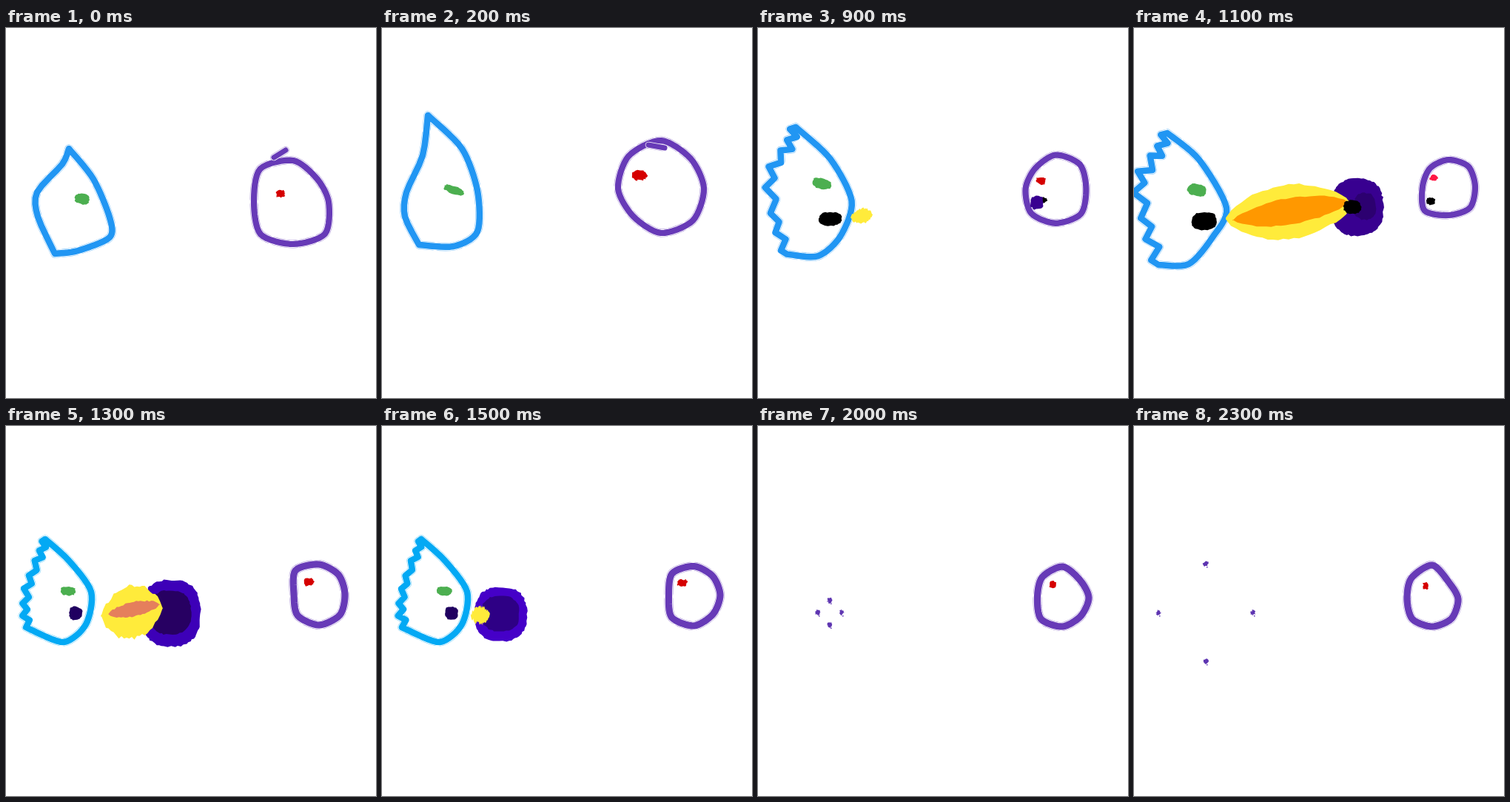
Recreate the animation shown at these times as an HTML page with a canvas. Size 500 by 500 pixels, loop 2400 ms.

```html
<!DOCTYPE html>
<html lang="en">
<head>
<meta charset="utf-8">
<title>Beam duel</title>
<style>
html, body { margin: 0; width: 100%; height: 100%; overflow: hidden; background: #fff; }
canvas { display: block; width: 500px; height: 500px; }
</style>
</head>
<body>
<canvas id="stage" width="500" height="500"></canvas>
<script>
const ctx = document.getElementById('stage').getContext('2d');
const STEP = 100, LOOP = 2400, TAU = Math.PI * 2;

let seed = 1;
function rnd() {
  seed = (seed * 16807) % 2147483647;
  return seed / 2147483647;
}
const jit = a => (rnd() * 2 - 1) * a;

// Values that blend linearly from key to key, and hold after the last.
class Track {
  constructor() { this.keys = []; }
  key(at, ...v) {
    this.keys.push({ at, v });
    return this;
  }
  get(f) {
    const i = Math.max(0, this.keys.findLastIndex(k => k.at <= f));
    const a = this.keys[i], b = this.keys[i + 1];
    if (!b) return a.v;
    const u = Math.max(0, (f - a.at) / (b.at - a.at));
    return a.v.map((x, j) => x + (b.v[j] - x) * u);
  }
}

const toPoints = v => Array.from({ length: v.length / 2 }, (_, i) => [v[2 * i], v[2 * i + 1]]);

// Smooth curve through a few points, n samples per span.
function curve(pts, n, closed) {
  const out = [], m = pts.length, spans = closed ? m : m - 1;
  const at = i => closed ? pts[(i + m) % m] : pts[Math.max(0, Math.min(m - 1, i))];
  for (let i = 0; i < spans; i++) {
    const [p, a, b, q] = [at(i - 1), at(i), at(i + 1), at(i + 2)];
    for (let s = 0; s < n; s++) {
      const u = s / n, u2 = u * u, u3 = u2 * u;
      out.push([0, 1].map(k =>
        a[k] * (2 * u3 - 3 * u2 + 1) + b[k] * (3 * u2 - 2 * u3) +
        0.42 * ((b[k] - p[k]) * (u3 - 2 * u2 + u) + (q[k] - a[k]) * (u3 - u2))));
    }
  }
  if (!closed) out.push(at(m - 1));
  return out;
}

// Push every second sample outwards and the others inwards.
function teeth(pts, size) {
  const last = pts.length - 1;
  return pts.map(([x, y], i) => {
    if (i === 0 || i === last) return [x, y];
    const dx = pts[i + 1][0] - pts[i - 1][0], dy = pts[i + 1][1] - pts[i - 1][1];
    const d = (i % 2 ? 1 : -1) * size * (0.85 + jit(0.25)) / Math.hypot(dx, dy);
    return [x + dy * d, y - dx * d];
  });
}

function trace(pts, closed) {
  ctx.beginPath();
  for (const [x, y] of pts) ctx.lineTo(x, y);
  if (closed) ctx.closePath();
}

function brush(pts, color, width, closed) {
  const line = (w, c, alpha) => {
    ctx.lineWidth = w;
    ctx.strokeStyle = c;
    ctx.globalAlpha = alpha;
    ctx.stroke();
    ctx.globalAlpha = 1;
  };
  trace(pts, closed);
  ctx.lineCap = ctx.lineJoin = 'round';
  // broken hairline along both edges
  ctx.setLineDash([19, 5, 31, 7]);
  line(width + 2.8, color, 0.5);
  ctx.setLineDash([]);
  line(width + 1.6, '#fff', 1);
  line(width, color, 1);
}

function fill(pts, color) {
  trace(pts);
  ctx.fillStyle = color;
  ctx.fill();
}

// Rounded box with a rough edge
function patch([cx, cy, rx, ry, tilt = 0], color, rough = 0.8) {
  const pts = [], n = Math.ceil(12 + (rx + ry) * 0.8);
  const bend = c => Math.sign(c) * Math.abs(c) ** 0.8;
  const co = Math.cos(tilt), si = Math.sin(tilt);
  for (let i = 0; i < n; i++) {
    const a = i / n * TAU;
    const x = rx * bend(Math.cos(a)) + jit(rough), y = ry * bend(Math.sin(a)) + jit(rough);
    pts.push([cx + x * co - y * si, cy + x * si + y * co]);
  }
  fill(pts, color);
}

// Spindle from one end to the other
function lens([x0, y0, x1, y1, h], color, rough) {
  const up = [], down = [], n = 24;
  for (let i = 0; i <= n; i++) {
    const u = i / n, x = x0 + (x1 - x0) * u, y = y0 + (y1 - y0) * u;
    const w = h * Math.sin(Math.PI * u) ** 0.65;
    up.push([x, y - w + jit(rough)]);
    down.unshift([x, y + w + jit(rough)]);
  }
  fill(up.concat(down), color);
}

// Left head: tooth size, then six points from the tip down the front, three up the back
const leftShape = new Track()
  .key(0, 0, 85,163, 118,204, 140,256, 140,283, 97,301, 66,305, 43,255, 42,222, 76,184)
  .key(2, 0, 62,118, 108,163, 129,220, 129,275, 97,295, 50,293, 31,255, 33,222, 55,172)
  .key(6, 4, 60,122, 112,175, 129,220, 120,278, 92,292, 48,284, 33,253, 30,192, 53,148)
  .key(11, 8, 45,142, 88,178, 125,243, 106,283, 74,319, 33,320, 18,270, 7,208, 34,170)
  .key(13, 4.5, 53,153, 85,182, 115,224, 108,268, 78,292, 33,275, 25,248, 31,212, 46,176);

// Right head: centre, then the reach in eight directions, clockwise from the right
const rightShape = new Track()
  .key(0, 388,235, 48, 61, 57, 62, 53, 63, 56, 45)
  .key(2, 377,217, 58, 61, 60, 53, 58, 62, 65, 57)
  .key(6, 368,222, 49, 59, 58, 48, 49, 45, 60, 59)
  .key(11, 425,214, 36, 41, 39, 46, 35, 35, 36, 38)
  .key(13, 423,227, 35, 40, 42, 41, 34, 45, 40, 37)
  .key(17, 420,230, 36, 33, 41, 44, 34, 38, 38, 35)
  .key(23, 403,234, 35, 37, 37, 38, 34, 40, 46, 32);
const penTail = new Track().key(0, 362,175, 378,165).key(2, 360,158, 382,162).key(6, 353,161, 364,160);

// Spots: centre, half size, tilt
const greenEye = new Track()
  .key(0, 103,231, 10,7, 0.15).key(2, 97,219, 14,5, 0.35)
  .key(6, 88,197, 13,6, 0.15).key(11, 85,219, 13,8, 0.25).key(13, 84,223, 10,6, 0.05);
const leftMouth = new Track()
  .key(4, 101,252, 8,3, 0).key(6, 102,253, 13,5, 0.04).key(11, 95,261, 17,12, -0.05).key(13, 94,253, 9,9, 0);
const redEye = new Track()
  .key(0, 371,224, 6,5).key(2, 348,199, 10,7).key(6, 348,212, 9,5)
  .key(11, 405,203, 5,4).key(13, 409,211, 7,5).key(23, 394,216, 4,5);
const rightMouth = new Track().key(8, 378,232, 4,3).key(11, 401,234, 6,5);

// Beam: both ends and half height. Ball: centre and half size.
const beam = new Track()
  .key(9, 125,256, 155,252, 10).key(11, 124,257, 294,240, 37)
  .key(13, 128,257, 212,246, 36).key(15, 120,256, 146,255, 12);
const flame = new Track()
  .key(10, 133,258, 215,246, 12).key(11, 133,260, 290,235, 18).key(13, 138,254, 208,241, 10);
const ball = new Track()
  .key(9, 377,236, 9,9).key(11, 302,242, 35,39).key(13, 223,253, 40,45)
  .key(17, 98,256, 31,28).key(19, 98,254, 13,12);
const heart = new Track()
  .key(10, 345,238, 8,9).key(11, 312,241, 15,18).key(13, 222,252, 28,30)
  .key(17, 98,255, 23,18).key(19, 98,254, 8,7);

function leftHead(f) {
  const [size, ...v] = leftShape.get(f);
  const pts = toPoints(v);
  const front = curve(pts.slice(0, 6), 8);
  const back = curve([...pts.slice(5), pts[0]], 4);
  brush(front.concat(teeth(back, size)), f < 12 ? '#2196f3' : '#03a9f4', 8.5, true);
  patch(greenEye.get(f), '#4caf50');
  if (f >= 4) patch(leftMouth.get(f), f < 7 ? '#d50000' : f < 13 ? '#000' : '#200060');
}

function rightHead(f) {
  const [cx, cy, ...reach] = rightShape.get(f);
  const pts = reach.map((r, i) => [cx + r * Math.cos(i * TAU / 8), cy + r * Math.sin(i * TAU / 8)]);
  brush(curve(pts, 8, true), '#673ab7', f < 13 ? 8.2 : 9.2, true);
  if (f <= 6) brush(toPoints(penTail.get(f)), '#673ab7', 7);
  patch(redEye.get(f), f === 11 ? '#ff1744' : '#d50000', 1.2);
  if (f >= 8 && f < 13) patch(rightMouth.get(f), '#000');
}

function clash(f) {
  if (f < 9 || f > 19) return;
  patch(ball.get(f), f < 12 ? '#380090' : f < 15 ? '#3d00b8' : '#4500c8', 1);
  if (f > 9) patch(heart.get(f), f < 12 ? '#2c0070' : f < 15 ? '#270062' : '#2e0085');
  if (f < 16) lens(beam.get(f), '#ffeb3b', f < 12 ? 1.5 : 3);
  if (f > 9 && f < 15) lens(flame.get(f), f < 12 ? '#ff9800' : '#e57f5c', 1);
  const [x, y] = ball.get(f);
  if (f === 10 || f === 11) patch([x - 7, y, 12, 9], '#000');
  if (f > 15 && f < 19) patch([x, y + 1, 10, 8], '#000', 1.5);
}

function sparks(f) {
  if (f < 20) return;
  const far = 16 * (f - 19);
  for (let i = 0; i < 4; i++) {
    const a = i * TAU / 4;
    const x = 97 + far * Math.cos(a), y = 252 + far * 1.03 * Math.sin(a);
    patch([x, y, 3, 3.5, 0.5], '#5e35b1', 1.2);
    ctx.fillRect(x + 1, y + 4, 1.5, 1.5);
  }
}

function draw(f) {
  seed = 911 + f * 7919;
  ctx.fillStyle = '#fff';
  ctx.fillRect(0, 0, 500, 500);
  if (f < 17) leftHead(f);
  rightHead(f);
  clash(f);
  sparks(f);
}

const start = performance.now();
function tick() {
  draw(Math.floor(((performance.now() - start) % LOOP) / STEP));
  requestAnimationFrame(tick);
}
tick();
</script>
</body>
</html>
```
